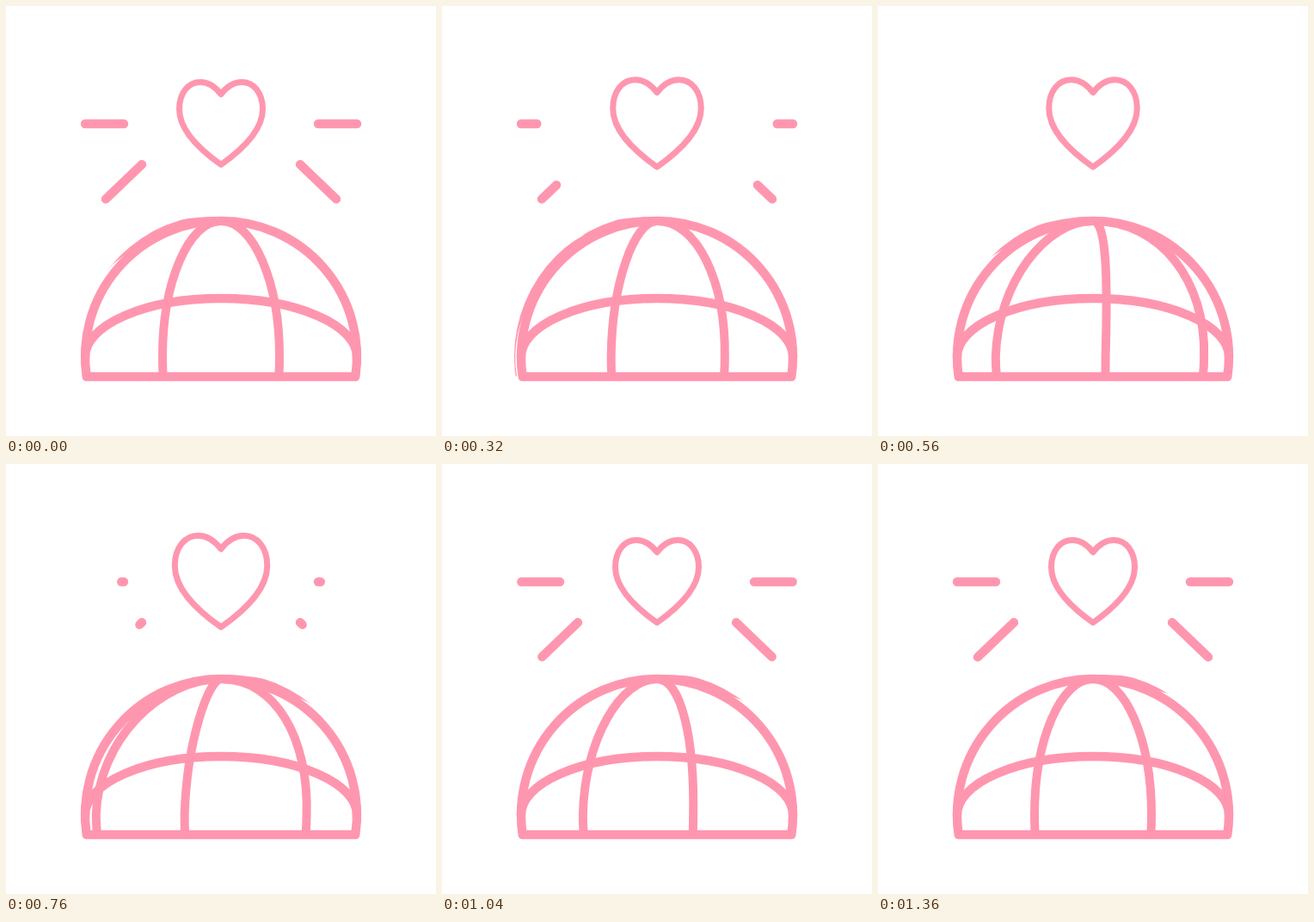
Write an HTML page that moves like this. It is 500x500 px and loops after 1440 ms.

```html
<!DOCTYPE html>
<html lang="en">
<head>
<meta charset="utf-8">
<title>Globe and heart</title>
<style>
  html, body { margin: 0; width: 100%; height: 100%; overflow: hidden; background: #fff; }
  svg { display: block; width: 100vw; height: 100vh; }
  g { fill: none; stroke: #ff96af; stroke-width: 10.4; stroke-linecap: round; stroke-linejoin: round; }
  #meridians { stroke-linecap: butt; stroke-width: 10; }
</style>
</head>
<body>
<svg viewBox="0 0 500 500">
  <clipPath id="sky"><circle cx="250" cy="408" r="166"/></clipPath>
  <g>
    <path d="M93.7 431A158 158 0 1 1 406.3 431Z"/>
    <path d="M92 408A158 68 0 0 1 408 408"/>
  </g>
  <g id="meridians" clip-path="url(#sky)"></g>
  <g id="rays">
    <path d="M137 137H92"/>
    <path d="M158 184.3L116 224.5"/>
    <path d="M363 137H408"/>
    <path d="M342 184.3L384 224.5"/>
  </g>
  <g>
    <path id="heart" d="M250 102.5C243 93.5 235 88.5 226 88.5C212 88.5 201.5 101 201.5 120C201.5 143 221 164 250 184.5C279 164 298.5 143 298.5 120C298.5 101 288 88.5 274 88.5C265 88.5 257 93.5 250 102.5Z"/>
  </g>
</svg>
<script>
const LOOP = 1440, STEP = 40;
const CX = 250, CY = 408, R = 158, BASE = 431;
const FOOT = Math.sqrt(1 - ((BASE - CY) / R) ** 2);
const KAPPA = 0.5523; // handle length of a quarter ellipse
const LEAD = 5;       // how far the upper part runs ahead while turning

// Signed half-width of each meridian before and after the turn
const SWEEPS = [[-243, -68], [-182, 68], [-68, 232], [68, 290]];

const progress = (t, from, to) => Math.min(1, Math.max(0, (t - from) / (to - from)));
const smooth = x => x * x * x * (x * (6 * x - 15) + 10);
const speed = x => 30 * x * x * (1 - x) * (1 - x);
const ease = (t, from, to) => smooth(progress(t, from, to));

const meridians = SWEEPS.map(() => {
  const el = document.createElementNS('http://www.w3.org/2000/svg', 'path');
  return document.getElementById('meridians').appendChild(el);
});
const rays = [...document.querySelectorAll('#rays path')].map(el => ({ el, length: el.getTotalLength() }));
const heart = document.getElementById('heart');

function drawMeridians(t) {
  const x = progress(t, 80, 1360);
  const lead = LEAD * speed(x);
  meridians.forEach((el, i) => {
    const [from, to] = SWEEPS[i];
    const w = from + (to - from) * smooth(x);
    const side = CX + w;
    el.setAttribute('d', `M${CX} ${CY - R}
      C${CX + w * KAPPA + lead} ${CY - R} ${side + lead * 0.3} ${CY - R * KAPPA} ${side} ${CY}
      Q${side} ${(CY + BASE) / 2} ${CX + w * FOOT} ${BASE}`);
  });
}

// Rays shrink outwards, then grow again from their inner ends
function drawRays(t) {
  const leaving = t < 600;
  const a = leaving ? ease(t, 100, 500) : 0;
  const b = leaving ? 1 : ease(t, 678, 1078);
  for (const { el, length } of rays) {
    el.style.visibility = b - a > 0.002 ? 'visible' : 'hidden';
    el.style.strokeDasharray = `${(b - a) * length} ${length * 2}`;
    el.style.strokeDashoffset = -a * length;
  }
}

// Two beats with a constant line weight
function drawHeart(t) {
  const beat = (1 - Math.cos(progress(t, 240, 1040) * 4 * Math.PI)) / 2;
  const s = 1 + 0.165 * beat;
  heart.setAttribute('transform', `translate(250 136.5) scale(${s}) translate(-250 -136.5)`);
  heart.style.strokeWidth = 7 / s;
}

const start = performance.now();
function tick() {
  const t = Math.floor((performance.now() - start) % LOOP / STEP) * STEP;
  drawMeridians(t);
  drawRays(t);
  drawHeart(t);
  requestAnimationFrame(tick);
}
tick();
</script>
</body>
</html>
```
